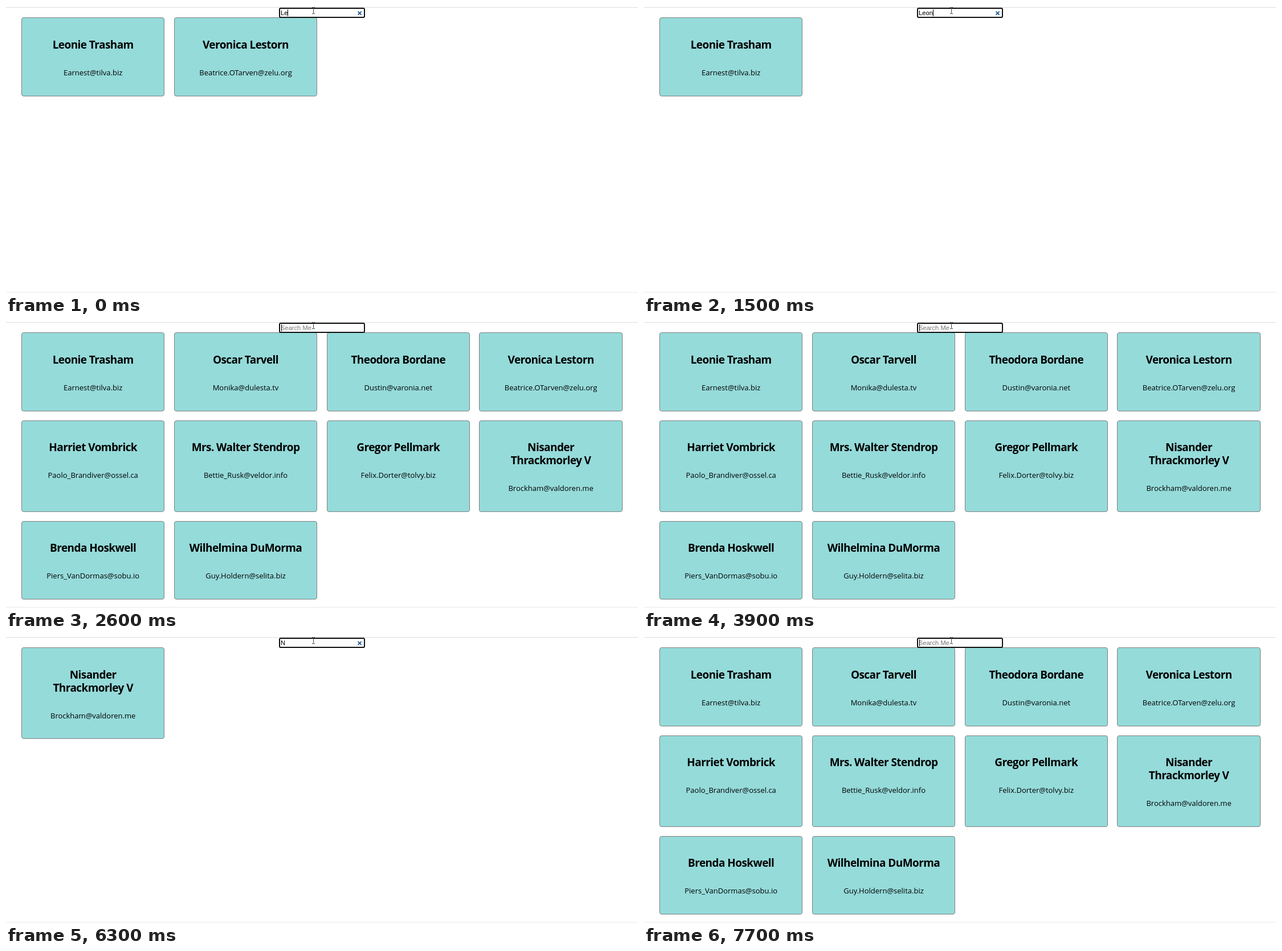
Recreate the animation shown at these times as an HTML page. Size 1109x505 px, loop 8 s.

```html
<!DOCTYPE html>
<html lang="en">
<head>
<meta charset="utf-8">
<title>Card search</title>
<style>
  html, body { margin: 0; width: 100%; height: 100%; overflow: hidden; background: #fff; }
  #stage { position: relative; width: 1109px; height: 505px; overflow: hidden; color: #000; }
  #stage::before, #stage::after { content: ""; position: absolute; left: 0; width: 100%; }
  #stage::before { top: 2px; height: 1px; background: #dcdcdc; }
  #stage::after { bottom: 0; height: 3px; background: linear-gradient(#fdfdfd, #f1f1f1); }
  .card {
    position: absolute; box-sizing: border-box; width: 251.4px;
    border: 1px solid #808080; border-radius: 4px; background: #95dbda;
    text-align: center; font-family: "Open Sans", "Noto Sans", sans-serif;
  }
  .card h2 { margin: 0 0 30px; font-size: 19px; line-height: 23px; letter-spacing: -.03em; white-space: pre; }
  .card p { margin: 0; font-size: 13px; line-height: 15px; white-space: nowrap; }
  #field {
    position: absolute; left: 479px; top: 3px; width: 151px; height: 18px; box-sizing: border-box;
    border: 2px solid #101010; border-radius: 3px; background: #fff;
  }
  #query {
    position: absolute; left: 482.1px; top: 6px; white-space: pre;
    font: 11.11px/12px "Liberation Sans", Arial, sans-serif;
  }
  #query.hint { color: #757575; }
  #caret { position: absolute; top: 6px; width: 1px; height: 12px; background: #000; }
  svg { position: absolute; left: 0; top: 0; fill: none; }
</style>
</head>
<body>
<div id="stage">
  <div id="cards"></div>
  <div id="field"></div>
  <span id="query"></span>
  <div id="caret"></div>
  <svg width="1109" height="24">
    <path id="clear" d="M617.6 9.6l6 6m0-6l-6 6" stroke="#1c5a94" stroke-width="1.8"/>
    <path d="M537 2.5h2l.5 .5l.5-.5h2M539.5 3v10M537 13.5h2l.5-.5l.5 .5h2" stroke="#444"/>
  </svg>
</div>
<script>
const people = [
  ["Leonie Trasham", "Earnest@tilva.biz"],
  ["Oscar Tarvell", "Monika@dulesta.tv"],
  ["Theodora Bordane", "Dustin@varonia.net"],
  ["Veronica Lestorn", "Beatrice.OTarven@zelu.org"],
  ["Harriet Vombrick", "Paolo_Brandiver@ossel.ca"],
  ["Mrs. Walter Stendrop", "Bettie_Rusk@veldor.info"],
  ["Gregor Pellmark", "Felix.Dorter@tolvy.biz"],
  ["Nisander\nThrackmorley V", "Brockham@valdoren.me"],
  ["Brenda Hoskwell", "Piers_VanDormas@sobu.io"],
  ["Wilhelmina DuMorma", "Guy.Holdern@selita.biz"]
];

// start time in ms, typed text, caret visible
const steps = [
  [0, "Le", 1], [300, "Leo", 1], [900, "Leo", 0], [1500, "Leon", 1],
  [2000, "Leon", 0], [2100, "Leo", 0], [2300, "Le", 0], [2500, "L", 0],
  [2600, "", 1], [3300, "", 0], [3900, "", 1],
  [4400, "N", 1], [4800, "Ni", 1], [5300, "Nis", 1], [5900, "Ni", 0], [6300, "N", 0],
  [6500, "", 1], [7100, "", 0], [7700, "", 1]
];

const LOOP = 8000, COLUMNS = 4, PITCH = 267.8, TEXT_LEFT = 482.1;
const rowTops = [20, 175, 352];
const $ = id => document.getElementById(id);

function add(parent, tag, text = "") {
  const el = document.createElement(tag);
  el.textContent = text;
  return parent.appendChild(el);
}

const cards = people.map(([name, mail]) => {
  const el = add($("cards"), "div");
  el.className = "card";
  add(el, "h2", name);
  add(el, "p", mail);
  return { el, name };
});

function layout(typed) {
  const shown = cards.filter(card => card.name.includes(typed));
  cards.forEach(card => card.el.hidden = !shown.includes(card));
  shown.forEach(({ el }, i) => {
    const row = Math.floor(i / COLUMNS);
    const peers = shown.slice(row * COLUMNS, (row + 1) * COLUMNS);
    const tall = peers.some(card => card.name.includes("\n"));
    el.style.left = 27 + PITCH * (i % COLUMNS) + "px";
    el.style.top = rowTops[row] + "px";
    el.style.height = (tall ? 161 : row ? 138 : 139) + "px";
    el.style.paddingTop = (row ? 35 : 36) + "px";
  });
}

function show([, typed, caretOn]) {
  const query = $("query");
  query.textContent = typed || "Search Me";
  query.className = typed ? "" : "hint";
  const end = typed ? TEXT_LEFT + query.getBoundingClientRect().width : 483;
  $("caret").style.left = Math.round(end) + "px";
  $("caret").style.visibility = caretOn ? "visible" : "hidden";
  $("clear").style.visibility = typed ? "visible" : "hidden";
  layout(typed);
}

const start = performance.now();
let current;

function tick() {
  const t = (performance.now() - start) % LOOP;
  const step = steps.findLast(([at]) => at <= t);
  if (step !== current) show(current = step);
  requestAnimationFrame(tick);
}
tick();
</script>
</body>
</html>
```
